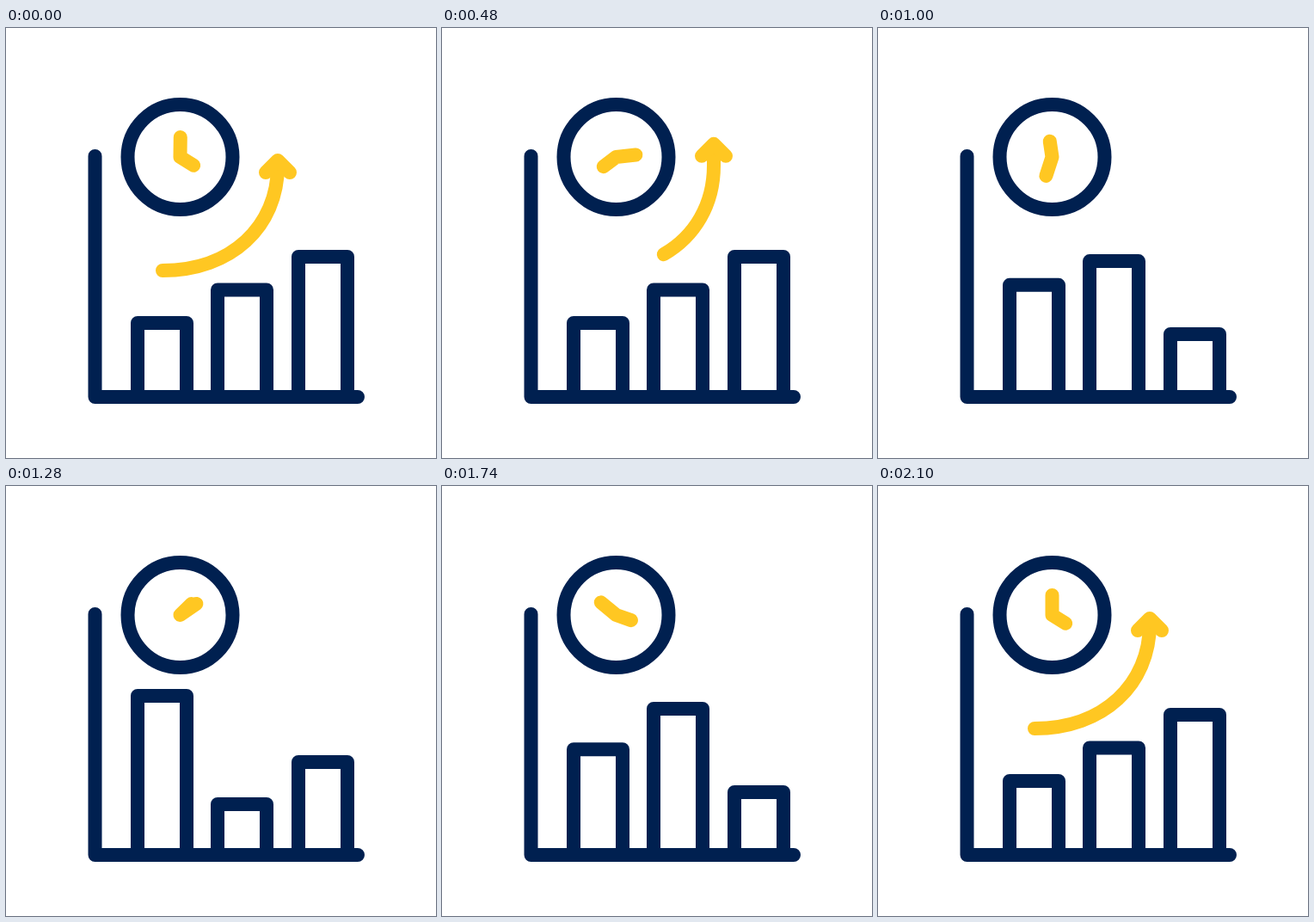
Write an HTML page that moves like this. It is 500 px wide and 500 px high and loops after 2180 ms.

```html
<!DOCTYPE html>
<html lang="en">
<head>
<meta charset="utf-8">
<title>Growth over time</title>
<style>
  html, body { margin: 0; width: 100%; height: 100%; overflow: hidden; background: #fff; }
  svg { display: block; width: 100vw; height: 100vh; }
  path, circle { fill: none; stroke: #002050; stroke-width: 16; stroke-linecap: round; stroke-linejoin: round; }
  .gold { stroke: #ffc722; }
</style>
</head>
<body>
<svg viewBox="0 0 500 500">
  <path class="bar"/><path class="bar"/><path class="bar"/>
  <path d="M103.5 149V429H409"/>
  <circle cx="202.5" cy="150" r="61"/>
  <path id="hands" class="gold"/>
  <g id="arrow">
    <path id="shaft" class="gold" d="M182 282C262 282 316 231 316 160V-80"/>
    <path id="head" class="gold" d="M-14 8L0 -6L14 8"/>
  </g>
</svg>
<script>
const LOOP = 2180;
const $ = id => document.getElementById(id);
const hands = $('hands'), arrow = $('arrow'), shaft = $('shaft'), head = $('head');
const RISE = 240;                      // straight run above the curve
const TOTAL = shaft.getTotalLength();
const CURVE = TOTAL - RISE;

// Left edge of each bar and its top as [ms, y] keys
const bars = [
  { x: 153, keys: [[500, 343], [700, 329], [1000, 299], [1280, 244], [1740, 306], [2000, 343]] },
  { x: 246, keys: [[500, 304.5], [700, 270], [850, 262], [1000, 271], [1280, 370], [1740, 259], [2000, 304.5]] },
  { x: 340, keys: [[500, 266], [700, 321], [1000, 356], [1280, 321], [1740, 356], [2000, 266]] }
];
const barPaths = document.querySelectorAll('.bar');

const progress = (t, from, to) => Math.min(1, Math.max(0, (t - from) / (to - from)));

// Cubic bezier easing with handles (.167, .167) and (.667, 1)
function ease(x) {
  const curve = (s, a, b) => 3 * (1 - s) ** 2 * s * a + 3 * (1 - s) * s * s * b + s ** 3;
  let lo = 0, hi = 1;
  for (let i = 0; i < 24; i++) {
    const mid = (lo + hi) / 2;
    if (curve(mid, .167, .667) < x) lo = mid; else hi = mid;
  }
  return curve(lo, .167, 1);
}

// Smooth track through the keys, flat at every turning point
function track(keys, t) {
  const last = keys.length - 1;
  if (t <= keys[0][0]) return keys[0][1];
  if (t >= keys[last][0]) return keys[last][1];
  const slope = i => (keys[i + 1][1] - keys[i][1]) / (keys[i + 1][0] - keys[i][0]);
  const tangent = i => {
    if (i === 0 || i === last) return 0;
    const a = slope(i - 1), b = slope(i);
    return a * b > 0 ? 2 * a * b / (a + b) : 0;
  };
  const i = keys.findIndex(k => k[0] > t) - 1;
  const [t0, y0] = keys[i], [t1, y1] = keys[i + 1];
  const d = t1 - t0, u = (t - t0) / d, v = 1 - u;
  return v * v * ((1 + 2 * u) * y0 + u * d * tangent(i))
       + u * u * ((1 + 2 * v) * y1 - v * d * tangent(i + 1));
}

function drawHands(t) {
  const turn = 360 * ease(progress(t, 0, 2000));
  const tip = (deg, length) => {
    const a = deg * Math.PI / 180;
    return `${202.5 + length * Math.sin(a)} ${150 - length * Math.cos(a)}`;
  };
  hands.setAttribute('d', `M${tip(4 * turn, 23)}L202.5 150L${tip(122 + turn, 18.5)}`);
}

function drawArrow(t) {
  const leaving = t < 667;
  arrow.style.display = leaving || t > 1750 ? '' : 'none';
  const out = progress(t, 333, 667);
  const back = 1 - (1 - progress(t, 1750, 2090)) ** 2;
  const end = leaving ? CURVE + 220 * out ** 3 : CURVE * back;
  const start = leaving ? (CURVE + 220) * out ** 2 * .95 : 0;
  shaft.setAttribute('stroke-dasharray', `${Math.max(.1, end - start)} 9999`);
  shaft.setAttribute('stroke-dashoffset', -start);
  const p = shaft.getPointAtLength(end);
  const a = shaft.getPointAtLength(Math.max(0, end - 1));
  const b = shaft.getPointAtLength(end + 1);
  const angle = end >= CURVE ? 0 : Math.atan2(b.y - a.y, b.x - a.x) * 180 / Math.PI + 90;
  const size = leaving ? 1 : Math.min(1, back * 2);
  head.setAttribute('transform', `translate(${p.x} ${p.y}) rotate(${angle}) scale(${size})`);
}

function draw(now) {
  const t = now % LOOP;
  bars.forEach(({ x, keys }, i) =>
    barPaths[i].setAttribute('d', `M${x} 429V${track(keys, t)}H${x + 57}V429`));
  drawHands(t);
  drawArrow(t);
}

const begin = performance.now();
function frame() {
  draw(performance.now() - begin);
  requestAnimationFrame(frame);
}
frame();
</script>
</body>
</html>
```
